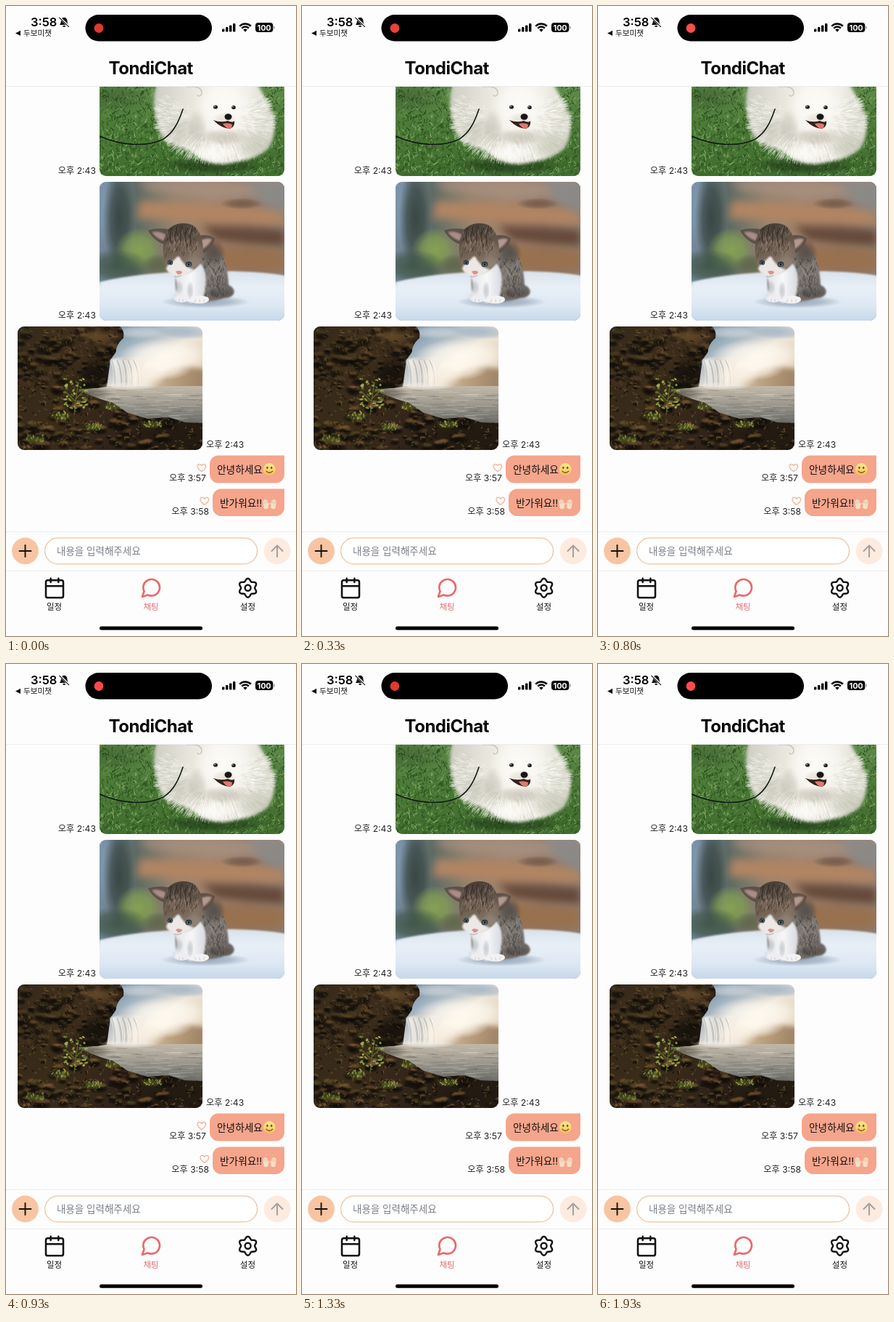
Recreate the animation shown at these times as an HTML page with a canvas. Size 400 px wide and 867 px high, loop 2 s.

```html
<!DOCTYPE html>
<html lang="ko">
<head>
<meta charset="utf-8">
<title>Chat</title>
<style>
html, body { margin: 0; width: 100%; height: 100%; overflow: hidden; background: #fefdfe; }
canvas { display: block; width: 400px; height: 867px; }
</style>
</head>
<body>
<canvas id="stage"></canvas>
<script>
const W = 400, H = 867, LOOP = 2000, STEP = LOOP / 30;
const FONT = 'Inter, "Noto Sans CJK KR", "Noto Sans CJK", sans-serif';
const ratio = Math.max(1, window.devicePixelRatio || 1);
const stage = document.getElementById('stage');
const screen2d = setup(stage);
const base = document.createElement('canvas');
const c = setup(base);

function setup(canvas) {
  canvas.width = W * ratio;
  canvas.height = H * ratio;
  const ctx = canvas.getContext('2d');
  ctx.scale(ratio, ratio);
  return ctx;
}

let seed = 7;
function rnd(a = 0, b = 1) {
  seed = (seed * 1664525 + 1013904223) >>> 0;
  return a + (b - a) * seed / 4294967296;
}
const pick = list => list[Math.floor(rnd(0, list.length))];

function text(str, x, y, size, color = '#111', align = 'left', weight = 400, spacing = 0) {
  c.font = `${weight} ${size}px ${FONT}`;
  c.letterSpacing = spacing + 'px';
  c.textAlign = align;
  c.fillStyle = color;
  c.fillText(str, x, y);
}

function box(x, y, w, h, r, color) {
  c.beginPath();
  c.roundRect(x, y, w, h, r);
  c.fillStyle = color;
  c.fill();
}

function oval(x, y, rx, ry, color, turn = 0) {
  c.beginPath();
  c.ellipse(x, y, rx, ry, turn, 0, Math.PI * 2);
  c.fillStyle = color;
  c.fill();
}

// Soft spot fading to nothing; rgb is "r,g,b"
function glow(x, y, rx, ry, rgb, alpha = 1) {
  c.save();
  c.translate(x, y);
  c.scale(rx, ry);
  const g = c.createRadialGradient(0, 0, 0, 0, 0, 1);
  g.addColorStop(0, `rgba(${rgb},${alpha})`);
  g.addColorStop(0.55, `rgba(${rgb},${alpha * 0.7})`);
  g.addColorStop(1, `rgba(${rgb},0)`);
  c.fillStyle = g;
  c.fillRect(-1, -1, 2, 2);
  c.restore();
}

function stroke(d, color, width, ctx = c) {
  ctx.strokeStyle = color;
  ctx.lineWidth = width;
  ctx.lineCap = ctx.lineJoin = 'round';
  ctx.stroke(new Path2D(d));
}

function shape(d, color, blur = 0) {
  c.filter = blur ? `blur(${blur}px)` : 'none';
  c.fillStyle = color;
  c.fill(new Path2D(d));
  c.filter = 'none';
}

function ramp(x0, y0, x1, y1, ...colors) {
  const g = c.createLinearGradient(x0, y0, x1, y1);
  colors.forEach((k, i) => g.addColorStop(i / (colors.length - 1), k));
  return g;
}

// Short random strokes inside a box, for fur, grass and rock
function flecks(n, x0, y0, x1, y1, colors, len, width, lean = 0, spread = 1) {
  c.lineWidth = width;
  c.lineCap = 'round';
  for (let i = 0; i < n; i++) {
    const x = rnd(x0, x1), y = rnd(y0, y1), a = lean + rnd(-spread, spread), l = rnd(0.4, 1) * len;
    c.strokeStyle = pick(colors);
    c.beginPath();
    c.moveTo(x, y);
    c.lineTo(x + Math.cos(a) * l, y + Math.sin(a) * l);
    c.stroke();
  }
}

function within(d, paint) {
  c.save();
  c.clip(new Path2D(d));
  paint();
  c.restore();
}

function photo(x, y, w, h, r, paint) {
  c.save();
  c.beginPath();
  c.roundRect(x, y, w, h, r);
  c.clip();
  paint();
  c.restore();
}

function icon(x, y, scale, paint) {
  c.save();
  c.translate(x, y);
  c.scale(scale, scale);
  paint();
  c.restore();
}

function dog() {
  c.fillStyle = ramp(0, 110, 0, 234, '#5f8a4a', '#4a7836', '#416d2f');
  c.fillRect(129, 110, 255, 124);
  flecks(1800, 127, 110, 386, 238, ['#294a1f', '#375f2a', '#5d8c45', '#7fa862', '#31561f'], 6, 1.1, -1.4, 1.2);
  glow(150, 125, 50, 22, '35,60,28', 0.35);
  glow(285, 220, 80, 12, '25,48,20', 0.6);
  const coat = 'M208 105C202 125 203 143 209 160C212 174 216 183 226 188C240 196 254 198 268 209C280 218 302 220 318 214C334 212 352 206 362 195C372 180 373 162 367 146C361 130 352 118 346 105Z';
  shape(coat, ramp(205, 150, 372, 165, '#cfcfc4', '#e6e4da', '#f3f1e9', '#f0eee6', '#d3d3c5'), 2);
  // loose hair pointing away from the face
  c.lineCap = 'round';
  for (let i = 0; i < 1500; i++) {
    const a = rnd(-0.6, 3.7), r = Math.sqrt(rnd(0.2, 1)), l = rnd(4, 9);
    const x = 288 + Math.cos(a) * 79 * r, y = 154 + Math.sin(a) * 58 * r;
    c.strokeStyle = pick(['rgba(255,255,250,.5)', 'rgba(190,188,175,.3)', 'rgba(240,238,228,.5)']);
    c.lineWidth = 0.9;
    c.beginPath();
    c.moveTo(x, y);
    c.lineTo(x + Math.cos(a) * l, y + Math.sin(a) * l);
    c.stroke();
  }
  within(coat, () => {
    glow(240, 172, 26, 22, '176,174,160', 0.4);
    glow(345, 192, 32, 22, '178,178,160', 0.45);
    glow(264, 168, 14, 28, '165,162,148', 0.35);
    glow(300, 180, 36, 12, '180,174,160', 0.55);
    glow(300, 138, 42, 40, '254,253,250', 0.85);
    glow(285, 203, 30, 13, '255,254,250', 0.7);
  });
  stroke('M250 111Q268 109 270 118Q270 126 264 123', '#d0c8ba', 1.6);
  stroke('M244 142C239 157 232 174 217 183C194 195 158 192 129 179', '#131a15', 1.6);
  glow(301, 156, 17, 10, '222,214,200', 0.6);
  oval(289, 139, 3, 2.6, '#221d1c');
  oval(314, 139.5, 2.8, 2.6, '#221d1c');
  oval(306.5, 152.5, 5, 4.2, '#171718');
  shape('M286 157Q296 161 306 158Q313 161 315 158Q316 166 309 169Q296 168 286 157Z', '#33201f', 0.4);
  shape('M299 162Q306 160 312 163Q312 169 307 169Q302 167 299 162Z', '#dd7870');
  oval(288, 138.2, 0.8, 0.7, '#fff');
  oval(313, 138.7, 0.7, 0.7, '#fff');
}

function cat() {
  c.fillStyle = ramp(129, 0, 384, 0, '#758a9d', '#5d6a64', '#94836f', '#a3836c', '#8d7464', '#8a8078');
  c.fillRect(129, 242, 255, 191);
  glow(133, 268, 20, 60, '128,150,172', 0.9);
  glow(156, 292, 22, 72, '52,66,62', 0.9);
  shape('M180 240L384 240V262L290 268L195 252Z', '#a58e7e', 7);
  shape('M185 268L384 278V304L250 296L180 292Z', '#b18563', 6);
  shape('M270 302L384 308V332L290 322Z', '#66493a', 6);
  shape('M290 330L384 334V366L280 364Z', '#98714f', 6);
  shape('M334 240H390V288L352 270Z', '#8b8987', 7);
  glow(325, 272, 30, 8, '96,72,58', 0.6);
  glow(183, 335, 32, 30, '136,164,82', 0.95);
  glow(150, 358, 46, 24, '58,80,62', 0.8);
  glow(212, 356, 26, 15, '84,96,64', 0.7);
  shape('M129 380C170 369 233 364 300 365C340 365 370 368 390 372V440H120Z',
    ramp(0, 365, 0, 433, '#d9e2ec', '#e8eff7', '#dfe9f4', '#c8d8ea'), 1);
  glow(275, 407, 62, 9, '125,142,164', 0.7);
  // body, chest, tail and paws
  shape('M282 325C300 338 306 360 307 384C319 389 317 402 301 402C284 408 251 409 239 403C230 383 232 358 251 348Z',
    ramp(250, 340, 312, 400, '#6e655e', '#7d7772', '#66605c'), 1);
  flecks(170, 270, 345, 302, 397, ['rgba(70,64,60,.6)', 'rgba(150,144,138,.5)'], 6, 1.2, 1.5, 0.5);
  glow(287, 340, 16, 20, '62,54,48', 0.55);
  glow(293, 395, 20, 8, '60,56,56', 0.5);
  shape('M230 366C240 372 258 368 268 354C278 365 277 384 272 402L260 408Q250 410 247 403L242 407Q230 408 229 398C239 393 237 381 230 366Z',
    ramp(230, 0, 280, 0, '#dfe0e4', '#f8f8fa', '#ced2d8'), 0.8);
  glow(254, 392, 5, 14, '172,178,188', 0.6);
  glow(238, 387, 7, 10, '170,172,180', 0.5);
  oval(243, 403, 10, 5, '#eeedf0');
  oval(267, 404, 13, 5.5, '#f2f1f3');
  for (const x of [239, 244, 261, 267, 273]) stroke(`M${x} 404v3`, 'rgba(205,188,188,.8)', 0.8);
  // head and ears
  shape('M196 309C208 305 220 306 231 309L222 329C212 327 203 321 196 309Z', '#5c4f47', 0.6);
  shape('M201 311Q212 309 221 315L218 323Q207 320 201 311Z', '#a98d86', 0.8);
  shape('M258 319C270 313 282 315 288 320C286 331 278 338 268 342Z', '#5e5149', 0.6);
  shape('M264 325Q276 318 284 321Q279 331 268 336Z', '#b39890', 0.8);
  const head = 'M222 311C228 299 246 296 258 302C270 311 274 330 271 345C266 362 251 370 238 370C225 368 217 358 217 342C216 327 218 319 222 311Z';
  shape(head, ramp(232, 300, 250, 370, '#473e36', '#6d5d50', '#94877b'), 0.7);
  within(head, () => {
    glow(231, 327, 8, 17, '139,119,100', 0.55);
    glow(260, 336, 11, 13, '143,124,106', 0.55);
    flecks(150, 220, 300, 266, 340, ['rgba(48,41,36,.5)', 'rgba(160,142,125,.4)'], 7, 1, 1.7, 0.4);
    for (let i = 0; i < 5; i++) stroke(`M${229 + i * 7} ${303 + Math.abs(i - 2)}q-4 10-2 20`, 'rgba(45,38,34,.65)', 1.6);
  });
  shape('M236 345C231 352 221 356 221 362C226 373 246 376 260 363C253 361 246 358 239 345Z', '#ece8e6', 1);
  glow(259, 352, 11, 10, '150,137,125', 0.6);
  oval(226.5, 353, 3.8, 3.4, '#303a3c', 0.2);
  oval(252, 355.5, 4.5, 3.7, '#303a3c', -0.2);
  oval(226.5, 353.5, 2.5, 2.2, '#627a84');
  oval(252, 356, 2.9, 2.3, '#627a84');
  oval(226.5, 353.5, 1.4, 1.7, '#171d20');
  oval(252, 355.7, 1.5, 1.8, '#171d20');
  shape('M234 365.5Q239 363 243.5 366Q241 370 237 369.5Z', '#dd908c', 0.4);
  stroke('M232 372Q237 373.5 242 371', 'rgba(140,125,122,.7)', 0.8);
}

// Rock face: dark hollows with lit upper edges
function boulders(n, x0, y0, x1, y1, lit) {
  for (let i = 0; i < n; i++) {
    const x = rnd(x0, x1), y = rnd(y0, y1), r = rnd(4, 12);
    glow(x, y + r * 0.4, r, r * 0.6, '14,11,8', 0.8);
    glow(x + 1, y - r * 0.2, r * 0.8, r * 0.35, pick(lit), 0.7);
  }
}

function falls() {
  c.fillStyle = ramp(150, 441, 215, 530, '#6f8ba6', '#a9b8c3', '#efe7da', '#e0d0ba');
  c.fillRect(16, 441, 255, 170);
  glow(182, 449, 36, 9, '220,222,222', 0.6);
  glow(250, 449, 40, 10, '150,172,194', 0.7);
  glow(220, 482, 65, 24, '255,250,240', 0.95);
  shape('M190 528C205 503 232 493 275 500V530H190Z', ramp(190, 500, 275, 520, '#dccab2', '#b99d7d', '#9c8064'), 3);
  glow(215, 499, 42, 16, '255,249,238', 0.85);
  c.fillStyle = ramp(0, 521, 0, 580, '#c3b9a9', '#aaa498', '#86847e', '#62625d');
  c.fillRect(80, 523, 191, 70);
  glow(110, 533, 38, 9, '72,68,58', 0.7);
  flecks(90, 120, 528, 270, 572, ['rgba(235,230,220,.22)', 'rgba(75,77,74,.22)'], 28, 1.2, 0, 0.05);
  const cliff = 'M16 441H157Q164 447 162 457Q152 465 151 477L144 487L139 524Q90 530 16 530Z';
  shape(cliff, ramp(16, 441, 140, 525, '#31271a', '#3e2e1c', '#3a2b1a', '#1b150e'), 0.6);
  within(cliff, () => {
    boulders(75, 16, 441, 160, 525, ['104,76,42', '82,62,34', '68,58,30']);
    glow(128, 455, 36, 14, '132,96,54', 0.5);
    glow(120, 508, 24, 22, '16,13,9', 0.75);
    flecks(260, 16, 441, 160, 528, ['rgba(20,16,10,.7)', 'rgba(125,94,54,.45)'], 5, 1.2, 0.8, 0.8);
  });
  shape('M143 488Q154 481 188 484Q197 490 186 496Q181 505 180 524H146Q152 504 143 488Z',
    ramp(146, 0, 196, 0, '#e9e7e3', '#d0cec9', '#f2ede4', '#f7f0e4'), 1.2);
  for (let i = 0; i < 14; i++) {
    const x = 146 + i * 2.5;
    stroke(`M${x} 488q${5 + i * 0.2} 12 ${4 + rnd(0, 3)} 34`, i % 3 ? 'rgba(255,253,248,.55)' : 'rgba(150,148,144,.45)', 1.3);
  }
  glow(192, 510, 30, 17, '249,240,226', 0.85);
  glow(170, 523, 42, 6, '240,235,226', 0.8);
  const shore = 'M16 524Q60 519 96 526Q118 538 147 546L168 560L195 568L224 566L247 573L275 574V615H16Z';
  shape(shore, ramp(16, 520, 200, 611, '#35291a', '#3b2c19', '#33251a', '#231a12'), 0.5);
  within(shore, () => {
    boulders(110, 16, 524, 271, 611, ['128,90,50', '104,76,42', '88,74,36', '146,104,62']);
    flecks(380, 16, 524, 271, 611, ['rgba(18,13,8,.8)', 'rgba(140,102,60,.55)', 'rgba(92,92,42,.6)'], 4, 1.4, 0.2, 1.4);
    for (const [x, y] of [[150, 551], [75, 565], [202, 576], [121, 580], [40, 596]]) {
      glow(x, y, 17, 6, '92,104,36', 0.6);
      flecks(24, x - 12, y - 4, x + 12, y + 4, ['#7f8c38', '#566425', '#969c4a'], 3, 1.3, -1.5, 1);
    }
  });
  stroke('M94 562Q96 540 100 518M96 544L82 531M97 540L110 527', '#626d2d', 1.1);
  for (let i = 0; i < 46; i++) {
    oval(rnd(80, 114), rnd(513, 560), rnd(1.5, 3), rnd(0.8, 1.6), pick(['#7e913c', '#a2a952', '#586d2b']), rnd(-1, 1));
  }
}

function statusBar() {
  text('3:58', 34, 28, 16.5, '#000', 'left', 600);
  icon(72, 14, 0.68, () => {
    shape('M18.3 9A6.3 6.3 0 0 0 5.7 9c0 6-2.7 8-2.7 8.5h18S18.3 15 18.3 9ZM9 19h6a3 3 0 0 1-6 0Z', '#111');
    stroke('M3 3L22 21', '#fefdfe', 4.2);
    stroke('M2.5 3L21.5 21.5', '#111', 1.7);
  });
  shape('M20 33.7V41L13 37.4Z', '#111');
  text('두보미챗', 24, 41, 10.6, '#111');
  box(109.5, 12, 174.5, 36.5, 18.3, '#000');
  for (let i = 0; i < 4; i++) {
    const h = 4 + i * 2.5;
    box(298 + i * 5, 35.5 - h, 3.4, h, 1, '#000');
  }
  c.strokeStyle = '#000';
  c.lineCap = 'butt';
  for (const r of [10.6, 6.5]) {
    c.beginPath();
    c.arc(330, 35, r, -Math.PI * 0.76, -Math.PI * 0.24);
    c.lineWidth = 2.5;
    c.stroke();
  }
  shape('M330 35.7L327.2 32.6Q330 30.2 332.8 32.6Z', '#000');
  box(344, 23, 24.3, 13, 4, '#000');
  box(369.2, 27.4, 1.4, 4.4, 1, '#999');
  text('100', 356.1, 33.5, 11, '#fff', 'center', 700, -0.2);
}

function messages() {
  const stamp = (s, x, y, align) => text(s, x, y, 12.2, '#222', align);
  stamp('오후 2:43', 124, 231, 'right');
  stamp('오후 2:43', 124, 430, 'right');
  stamp('오후 2:43', 276, 608, 'left');
  stamp('오후 3:57', 276, 654, 'right');
  stamp('오후 3:58', 280, 699.5, 'right');
  const pink = '#f4a58c';
  box(281, 618.5, 103, 38, [12, 0, 12, 12], pink);
  box(285, 664.5, 99, 37.5, [12, 0, 12, 12], pink);
  text('안녕하세요', 291, 642.5, 13.7, '#111');
  text('반가워요!!', 295, 688.5, 13.7, '#111');
  oval(363.3, 637.6, 8.4, 8.4, ramp(0, 629, 0, 646, '#fdeb8c', '#f3c053'));
  oval(360.4, 635.4, 1.1, 1.6, '#62421c');
  oval(366.2, 635.4, 1.1, 1.6, '#62421c');
  stroke('M358.8 640.2Q363.3 644.6 367.8 640.2', '#62421c', 1.1);
  for (const side of [-1, 1]) {
    c.save();
    c.translate(363.6 + side * 5.2, 686);
    c.scale(side, 1);
    c.rotate(0.12);
    box(-3, -3, 6.4, 9.2, 2.6, '#f5dfc6');
    for (let i = 0; i < 4; i++) stroke(`M${-2.2 + i * 1.6} -1V${i === 0 || i === 3 ? -5 : -6.4}`, '#f5dfc6', 1.5);
    stroke('M-2 2L-4 -1', '#f5dfc6', 1.7);
    stroke('M-1.4 -1V-4M.2 -1V-4.8M1.8 -1V-4', '#d9b795', 0.4);
    c.restore();
  }
  stroke('M363.6 674V677M359 674.6L360 677M368.2 674.6L367.2 677', '#d9c09c', 1);
}

function controls() {
  c.fillStyle = '#ececef';
  c.fillRect(0, 110, W, 1);
  c.fillRect(0, 723, W, 1);
  c.fillRect(0, 777, W, 1);
  oval(26.5, 750, 18.4, 18.4, '#f8c5a2');
  stroke('M18.5 750H34.5M26.5 742V758', '#111', 1.9);
  c.beginPath();
  c.roundRect(53.6, 732.1, 293, 35.8, 17.9);
  c.fillStyle = '#fff';
  c.fill();
  c.strokeStyle = '#f0c39c';
  c.lineWidth = 1.3;
  c.stroke();
  text('내용을 입력해주세요', 70, 755, 13.5, '#7b7f86');
  oval(374, 750, 18.4, 18.4, '#fdebdf');
  stroke('M374 758V742.5M366.5 750L374 742.5L381.5 750', '#a5a09e', 2);

  const red = '#e8696c';
  icon(51, 785, 4 / 3, () => {
    stroke('M5 4H19A2 2 0 0 1 21 6V20A2 2 0 0 1 19 22H5A2 2 0 0 1 3 20V6A2 2 0 0 1 5 4ZM16 2V6M8 2V6M3 10H21', '#111', 1.9);
  });
  icon(184, 785, 4 / 3, () => {
    stroke('M21 11.5a8.4 8.4 0 0 1-.9 3.8 8.5 8.5 0 0 1-7.6 4.7 8.4 8.4 0 0 1-3.8-.9L3 21l1.9-5.7a8.4 8.4 0 0 1-.9-3.8 8.5 8.5 0 0 1 4.7-7.6 8.4 8.4 0 0 1 3.8-.9h.5a8.5 8.5 0 0 1 8 8z', red, 2);
  });
  let gear = '';
  for (let i = 0; i < 120; i++) {
    const a = i / 120 * Math.PI * 2, r = 11.2 + 1.7 * Math.cos(6 * a);
    gear += `${i ? 'L' : 'M'}${333.6 + r * Math.sin(a)} ${800.8 - r * Math.cos(a)}`;
  }
  stroke(gear + 'ZM337.6 800.8A4 4 0 1 1 329.6 800.8A4 4 0 1 1 337.6 800.8', '#111', 2.4);
  text('일정', 66.6, 830.5, 11.5, '#111', 'center');
  text('채팅', 200, 830.5, 11.5, red, 'center');
  text('설정', 333.4, 830.5, 11.5, '#111', 'center');
  box(129, 853.8, 142, 5, 2.5, '#000');
}

function paintBase() {
  c.fillStyle = '#fefdfe';
  c.fillRect(0, 0, W, H);
  photo(129, 111, 255, 123, [0, 0, 9, 9], dog);
  photo(129, 242, 255, 191, 9, cat);
  photo(16, 441, 255, 170, 9, falls);
  statusBar();
  text('TondiChat', 199.7, 93.5, 24, '#080808', 'center', 700, -0.5);
  messages();
  controls();
}

function heart(x, y) {
  stroke(`M${x} ${y + 5.2}C${x - 9} ${y - 1} ${x - 5.6} ${y - 5.2} ${x - 3} ${y - 5}Q${x - 1} ${y - 5} ${x} ${y - 3}Q${x + 1} ${y - 5} ${x + 3} ${y - 5}C${x + 5.6} ${y - 5.2} ${x + 9} ${y - 1} ${x} ${y + 5.2}Z`,
    '#f3ad91', 1.2, screen2d);
}

function draw(now) {
  const t = Math.floor((now % LOOP) / STEP) * STEP;
  screen2d.drawImage(base, 0, 0, W, H);
  if (t < 1190) {
    heart(269.8, 635.6);
    heart(273.8, 681.4);
  }
  const lit = (1 - Math.cos(t / 1333 * Math.PI * 2)) / 2;
  const mix = (a, b) => Math.round(a + (b - a) * lit);
  screen2d.fillStyle = `rgb(${mix(222, 255)},${mix(57, 78)},${mix(45, 82)})`;
  screen2d.beginPath();
  screen2d.arc(128, 30.5, 6.4, 0, Math.PI * 2);
  screen2d.fill();
}

paintBase();
let start;
function tick(now) {
  start ??= now;
  draw(now - start);
  requestAnimationFrame(tick);
}
draw(0);
requestAnimationFrame(tick);
</script>
</body>
</html>
```
